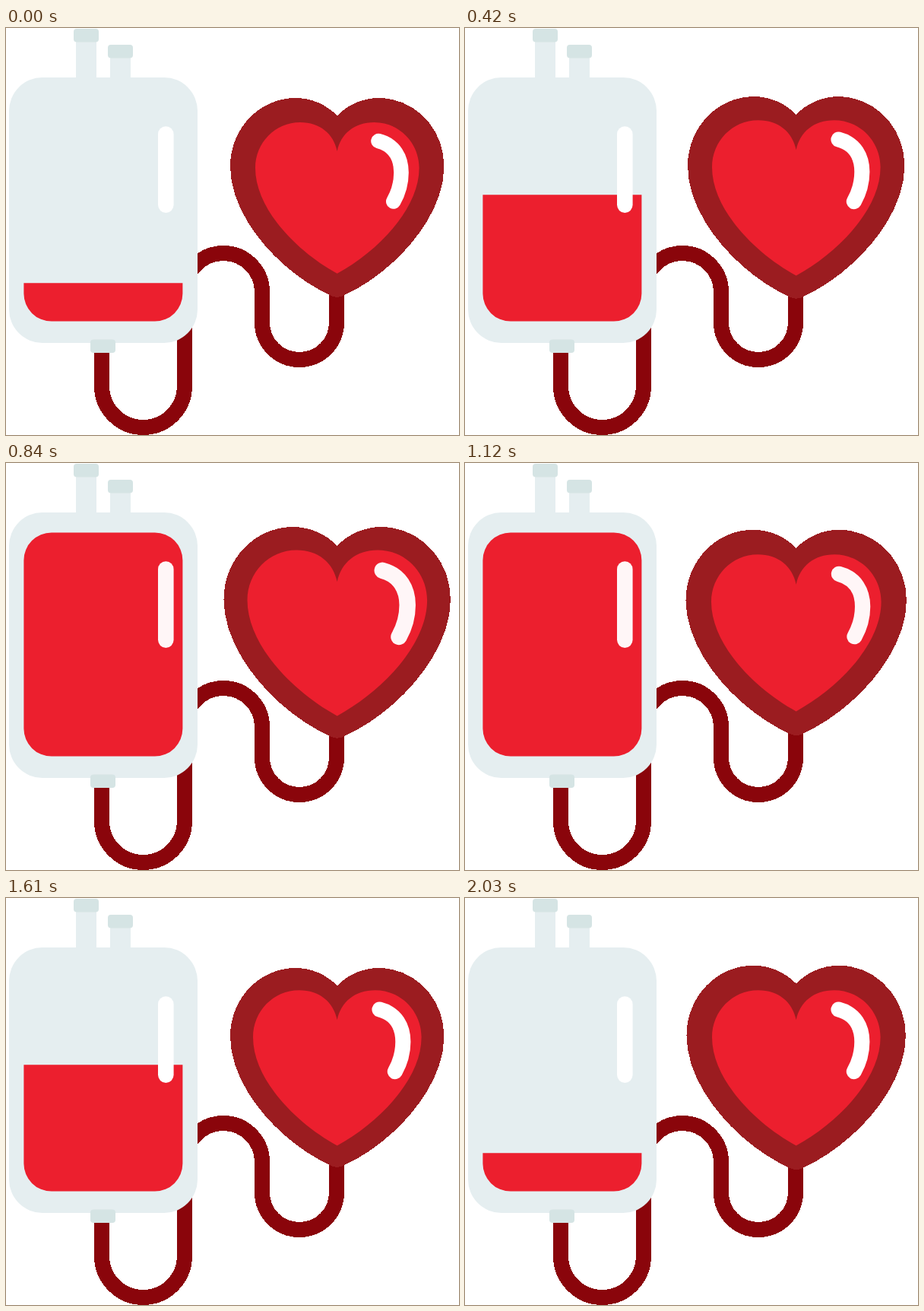
These frames come from a looping animation (596x535 px, 2.1 s). An HTML page:

```html
<!DOCTYPE html>
<html lang="en">
<head>
<meta charset="utf-8">
<title>Blood donation</title>
<style>
  html, body { margin: 0; width: 100%; height: 100%; overflow: hidden; background: #fff; }
  svg { display: block; width: 596px; height: 535px; }
  .bag { fill: #e5eef0; }
  .cap { fill: #d5e4e4; }
  .blood { fill: #ec1f2e; }
  .rim { fill: #9b1c20; shape-rendering: crispEdges; }
  .tube { fill: none; stroke: #8a050b; stroke-width: 20; shape-rendering: crispEdges; }
</style>
</head>
<body>
<svg viewBox="0 0 596 535">
  <defs>
    <clipPath id="fill"><rect id="level" x="0" y="335.3" width="260" height="100"/></clipPath>
  </defs>

  <path class="tube" d="M126 420V470.5A54.5 54.5 0 0 0 235 470.5V347A51 51 0 0 1 337 347V387A49 49 0 0 0 435 387V330"/>

  <g class="bag">
    <rect x="92" y="12" width="27" height="60"/>
    <rect x="137" y="32" width="27" height="40"/>
    <rect x="4" y="65" width="248" height="349" rx="44"/>
  </g>
  <g class="cap">
    <rect x="89" y="1" width="33" height="17.5" rx="4"/>
    <rect x="134" y="22" width="33" height="17.5" rx="4"/>
    <rect x="111" y="409.5" width="33" height="17.5" rx="4"/>
  </g>
  <rect class="blood" clip-path="url(#fill)" x="23.4" y="91.4" width="209" height="294.2" rx="36.5"/>
  <rect class="shine" x="200" y="129.3" width="20.6" height="113.6" rx="10.3" fill="#fff"/>

  <g id="outer">
    <path class="rim" d="M435.7 115.3C422 101 402 92 381 92C333.5 92 295 132 295 182C295 250 363 323 428 352Q435.7 355.6 443.4 352C508.4 323 576.4 250 576.4 182C576.4 132 537.9 92 490.4 92C469.4 92 449.4 101 435.7 115.3Z"/>
  </g>
  <g id="inner">
    <path class="blood" d="M435.7 162C431 139 413 124 387 124C354 124 328 151 328 184C328 238 383 294 435.7 322.7C488.4 294 543.6 238 543.6 184C543.6 151 517.4 124 484.4 124C458.4 124 440.4 139 435.7 162Z"/>
    <path class="shine-line" d="M490 148.6C511 154 520 171 520 190C520 205 516 217 509.8 228" fill="none" stroke="#fff" stroke-width="19.6" stroke-linecap="round"/>
  </g>
</svg>
<script>
  const STEP = 70, STEPS = 30;
  // Liquid surface, one entry for every five steps.
  const levels = [335.3, 219.3, 91, 91, 219.3, 335.3];
  // Widths of rim and core over one double beat.
  const rim = [281, 290, 310, 318, 318, 293, 285, 283, 281, 300, 318, 318, 298, 288, 288];
  const core = [216, 224, 228, 230, 230, 229, 222, 219, 222, 226, 230, 232, 237, 226, 222];

  const get = s => document.querySelector(s);
  const level = get('#level'), outer = get('#outer'), inner = get('#inner');
  const shine = get('.shine'), shineLine = get('.shine-line');

  const grow = (el, k) =>
    el.setAttribute('transform', `translate(435.7 223) scale(${k}) translate(-435.7 -223)`);

  function draw(ms) {
    const i = Math.floor(ms / STEP) % STEPS;
    const y = levels[Math.floor(i / 5)];
    const white = y < 100 ? '#fff6f7' : '#fff';
    level.setAttribute('y', y);
    level.setAttribute('height', 400 - y);
    grow(outer, rim[i % 15] / rim[0]);
    grow(inner, core[i % 15] / core[0]);
    shine.setAttribute('fill', white);
    shineLine.setAttribute('stroke', white);
  }

  const start = performance.now();
  function tick() {
    draw(performance.now() - start);
    requestAnimationFrame(tick);
  }
  tick();
</script>
</body>
</html>
```
